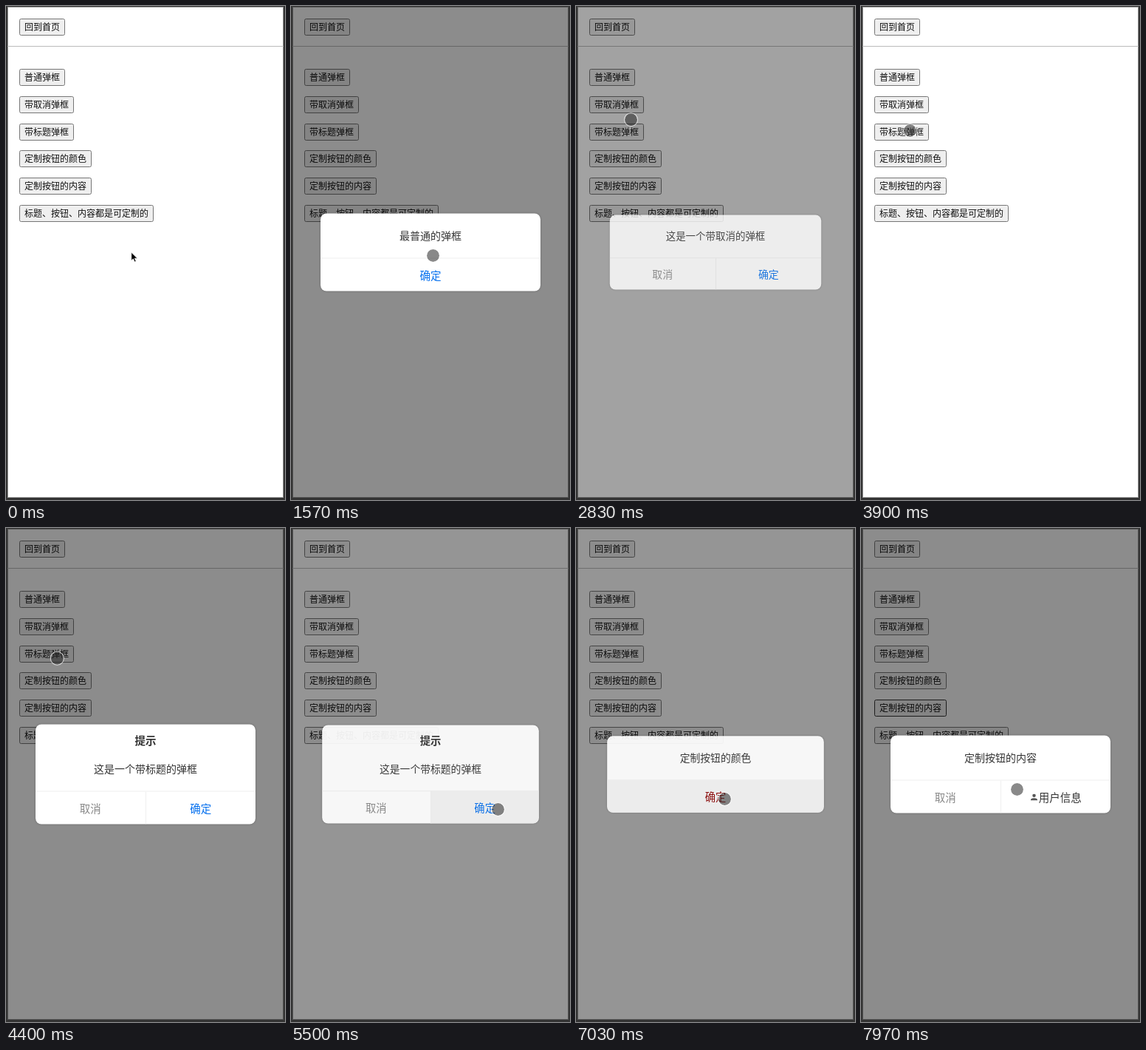
These frames come from a looping animation (378x668 px, 8 s). An HTML page:

```html
<!DOCTYPE html>
<html lang="zh-CN">
<head>
<meta charset="utf-8">
<title>弹框</title>
<style>
  * { box-sizing: border-box; }
  html, body { margin: 0; width: 100%; height: 100%; overflow: hidden; background: #333; }
  body { position: relative; font: 12px/20px "Noto Sans CJK SC", "Noto Sans CJK", sans-serif; }
  body > div, body > svg { position: absolute; }
  #page, #mask { left: 2px; top: 1px; width: 374px; height: 664px; }
  #page { background: #fff; box-shadow: inset 0 0 0 1px rgba(51, 51, 51, .5); }
  #mask { background: #000; }
  #page hr { position: absolute; top: 53px; width: 100%; height: 1px; margin: 0; border: 0; background: #bbb; }
  .btn {
    position: absolute; left: 16px; height: 23px; padding: 0 6px; white-space: nowrap;
    color: #111; background: #efefef; border: 1px solid #767676; border-radius: 2.5px;
  }
  .btn.active { border-color: #333; }
  #dialog {
    left: 40px; top: 333.3px; width: 298px; overflow: hidden; text-align: center; color: #333;
    background: #fff; border-radius: 8px; box-shadow: 0 0 3px #0004;
  }
  .title { font-size: 14.5px; font-weight: bold; line-height: 42px; margin-bottom: 3px; }
  .text { font-size: 14px; line-height: 58px; margin-bottom: 2px; }
  .title + .text { line-height: 28px; margin-bottom: 17px; }
  .foot { display: flex; height: 45px; border-top: 1px solid #f0f0f0; font-size: 14.5px; }
  .foot div { flex: 1; display: flex; align-items: center; justify-content: center; }
  .foot div + div { border-left: 1px solid #f0f0f0; }
  .pressed .foot div:last-child { background: #f3f3f3; }
  .foot svg { width: 9px; height: 9px; margin: 0 1.5px; fill: #555; }
  #touch {
    left: -9.5px; top: -9.5px; width: 19px; height: 19px; border-radius: 50%;
    background: rgba(40, 40, 40, .55); background-clip: padding-box; border: 1px solid rgba(255, 255, 255, .7);
  }
  #arrow { left: 169px; top: 332px; }
</style>
</head>
<body>
<div id="page"><hr></div>
<div id="mask"></div>
<div id="dialog"></div>
<svg id="arrow" width="11" height="16" viewBox="0 0 13 18"><path d="M1 1v13l3-2.8 2.3 5 2.2-1-2.3-4.8h4.3z" stroke="#fff" stroke-width=".8"/></svg>
<div id="touch"></div>
<script>
const LOOP = 8000, FADE = 200, PRESS = 100;
const $ = id => document.getElementById(id);
const page = $('page'), mask = $('mask'), dialog = $('dialog'), arrow = $('arrow'), touch = $('touch');

const labels = ['普通弹框', '带取消弹框', '带标题弹框', '定制按钮的颜色', '定制按钮的内容', '标题、按钮、内容都是可定制的'];
function addButton(label, top) {
  const el = document.createElement('div');
  el.className = 'btn';
  el.textContent = label;
  el.style.top = top + 'px';
  page.append(el);
  return el;
}
addButton('回到首页', 16);
const buttons = labels.map((label, i) => addButton(label, Math.round(84 + i * 36.8)));

const person = '<svg viewBox="4 4 16 16"><path d="M12 12a4 4 0 100-8 4 4 0 000 8zm0 2c-2.7 0-8 1.3-8 4v2h16v-2c0-2.7-5.3-4-8-4z"/></svg>';
const dialogs = [
  { open: 930, close: 1880, text: '最普通的弹框' },
  { open: 2730, close: 3660, text: '这是一个带取消的弹框', cancel: true },
  { open: 4200, close: 5484, text: '这是一个带标题的弹框', cancel: true, title: '提示' },
  { open: 6000, close: 7014, text: '定制按钮的颜色', color: '#8b0000' },
  { open: 7630, close: 9000, text: '定制按钮的内容', cancel: true, ok: person + '用户信息', color: '#333' },
];

// Touch point: start time, end time, destination
const moves = [
  [30, 630, 43, 94],
  [1000, 1570, 192, 337], [1570, 1760, 193, 362],
  [1900, 2370, 65, 143],
  [2740, 3440, 260, 362],
  [3680, 3900, 66, 168], [3900, 4030, 63, 170],
  [4300, 5330, 280, 380],
  [5520, 5800, 66, 207],
  [6150, 6880, 201, 366],
  [7060, 7330, 66, 243],
  [7650, 7970, 211, 353],
];

const clamp = v => Math.min(1, Math.max(0, v));
const smooth = v => v * v * (3 - 2 * v);

// CSS "ease": cubic-bezier(.25, .1, .25, 1)
function ease(x) {
  if (x <= 0 || x >= 1) return clamp(x);
  const bezier = (a, b, s) => 3 * a * s * (1 - s) ** 2 + 3 * b * s * s * (1 - s) + s ** 3;
  let low = 0, high = 1;
  for (let i = 0; i < 20; i++) {
    const mid = (low + high) / 2;
    if (bezier(.25, .25, mid) < x) low = mid; else high = mid;
  }
  return bezier(.1, 1, low);
}

function dialogHtml({ title, text, cancel, ok = '确定', color = '#006eee' }) {
  return (title ? `<div class="title">${title}</div>` : '') +
    `<div class="text">${text}</div><div class="foot">` +
    (cancel ? '<div style="color:#888">取消</div>' : '') +
    `<div style="color:${color}">${ok}</div></div>`;
}

function touchAt(t) {
  let x = 170, y = 338;
  for (const [start, end, toX, toY] of moves) {
    const k = smooth(clamp((t - start) / (end - start)));
    x += (toX - x) * k;
    y += (toY - y) * k;
  }
  return [x, y];
}

let shown = null;
function draw(t) {
  const current = dialogs.find(d => t >= d.open && t < d.close + FADE);
  if (current && current !== shown) dialog.innerHTML = dialogHtml(current);
  shown = current;
  const p = current ? ease((t - current.open) / FADE) - ease((t - current.close) / FADE) : 0;
  mask.style.opacity = p * .45;
  dialog.style.opacity = p;
  dialog.style.transform = `translateY(-50%) scale(${.8 + .2 * p})`;
  dialog.className = current && t >= current.close - PRESS ? 'pressed' : '';
  buttons[4].classList.toggle('active', current === dialogs[4]);

  const [x, y] = touchAt(t);
  touch.style.transform = `translate(${x}px, ${y}px)`;
  arrow.style.display = t < 30 ? '' : 'none';
  touch.style.display = t < 30 ? 'none' : '';
}

const began = performance.now();
function tick() {
  draw((performance.now() - began) % LOOP);
  requestAnimationFrame(tick);
}
tick();
</script>
</body>
</html>
```
